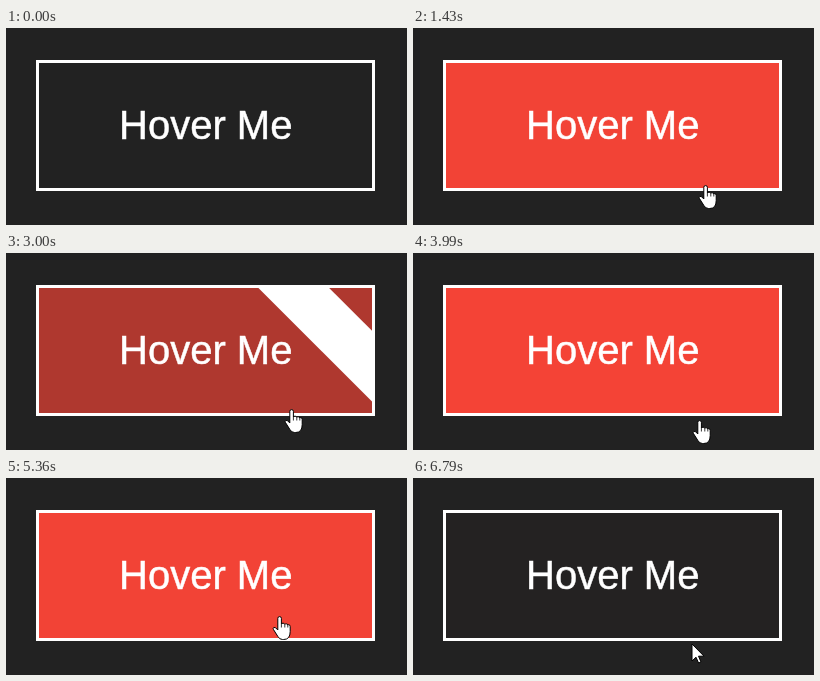
An HTML page for the animation above (7400 ms loop, 401 px wide and 197 px high).

```html
<!DOCTYPE html>
<html lang="en">
<head>
<meta charset="utf-8">
<title>Hover button</title>
<style>
  html, body { margin: 0; width: 100%; height: 100%; overflow: hidden; background: #222; }
  svg { display: block; }
  text { font: 40px "Liberation Sans", Arial, sans-serif; fill: #fff; stroke: #fff; stroke-width: .5; }
  .pointer { fill: #fff; stroke: #000; stroke-linejoin: round; }
  .fingers { fill: none; stroke-width: .8; }
</style>
</head>
<body>
<svg width="401" height="197" viewBox="0 0 401 197">
  <rect width="401" height="197" fill="#222"/>
  <svg x="33" y="35" width="333" height="125">
    <rect id="fill" width="333" height="125"/>
    <rect id="stripe" x="-25" y="-200" width="50" height="400" fill="#fff"/>
  </svg>
  <rect x="31.5" y="33.5" width="336" height="128" fill="none" stroke="#fff" stroke-width="3"/>
  <text x="113" y="111">Hover Me</text>
  <g id="cursor" class="pointer">
    <path id="arrow" d="M0 0V17L4 13.2 6.6 19 9 18 6.5 12.2H12Z"/>
    <g id="hand" transform="translate(-7.5 0)">
      <path d="M5.3 14V2.4a1.8 1.8 0 0 1 3.6 0V8q.3-.9 1.7-.8 1.6.1 1.7 1.2 .3-.7 1.4-.6 1.5.1 1.6 1.2 .3-.4 1-.3 1.4.2 1.4 1.9V15.5q0 8-6.5 8H10q-3 0-4.6-3L1 13.6q-.9-1.6 .3-2.2 1.6-.6 4 2.6Z"/>
      <path class="fingers" d="M8.9 8V11.5M12.3 8.5V11.5M15.3 9V11.5"/>
    </g>
  </g>
</svg>
<script>
  const LOOP = 7400, TRANSITION = 300, STEP = 74;
  // The button reacts this long before the pointer comes to rest
  const LEAD = 266;
  // The pointer waits below the stage, then by turns enters and leaves the button
  const HOME = { x: 299, y: 200 };
  const MOVES = [
    { start: 770, end: 1430, x: 293, y: 157 },
    { start: 1890, end: 2190, x: 293, y: 171 },
    { start: 2640, end: 3160, x: 286, y: 155 },
    { start: 3930, end: 4290, x: 288, y: 175 },
    { start: 4980, end: 5360, x: 274, y: 138 },
    { start: 6110, end: 6790, x: 279, y: 166 }
  ];
  const COLD = [34, 34, 34], HOT = [244, 67, 54];

  const $ = id => document.getElementById(id);
  const mix = (a, b, p) => a + (b - a) * p;

  // CSS "ease": cubic-bezier(.25, .1, .25, 1)
  function ease(x) {
    if (x <= 0 || x >= 1) return x <= 0 ? 0 : 1;
    const bezier = (a, b, s) => 3 * a * s * (1 - s) ** 2 + 3 * b * s * s * (1 - s) + s ** 3;
    let low = 0, high = 1;
    for (let i = 0; i < 20; i++) {
      const mid = (low + high) / 2;
      if (bezier(.25, .25, mid) < x) low = mid; else high = mid;
    }
    return bezier(.1, 1, low);
  }

  // Hold the picture between even steps of a move
  function snap(t, { start, end }) {
    const count = Math.round((end - start) / STEP);
    const step = (end - start) / count;
    return start + step * Math.min(count, Math.floor((t - start) / step + .2));
  }

  function draw(time) {
    const index = MOVES.findLastIndex(m => m.start <= time);
    const from = MOVES[index - 1] || HOME;
    const to = MOVES[index] || HOME;
    const t = index < 0 ? 0 : snap(time, to);

    const entering = index >= 0 && index % 2 === 0;
    const reacted = t >= to.end - LEAD;
    const hovered = entering === reacted && index >= 0;
    const eased = index < 0 ? 0 : ease((t - to.end + LEAD) / TRANSITION);
    const p = index < 0 || entering ? eased : 1 - eased;

    $("fill").setAttribute("fill", `rgb(${COLD.map((c, i) => Math.round(mix(c, HOT[i], p)))})`);
    $("stripe").setAttribute("transform", `translate(${mix(-125, 535, p)} 62.5) rotate(-45)`);

    const moved = index < 0 ? 0 : ease((t - to.start + STEP) / (to.end - to.start + STEP));
    const [x, y] = ["x", "y"].map(axis => Math.round(mix(from[axis], to[axis], moved)));
    $("cursor").setAttribute("transform", `translate(${x} ${y})`);
    $("hand").style.display = hovered ? "" : "none";
    $("arrow").style.display = hovered ? "none" : "";
  }

  const origin = performance.now();
  function tick() {
    draw((performance.now() - origin) % LOOP);
    requestAnimationFrame(tick);
  }
  tick();
</script>
</body>
</html>
```
